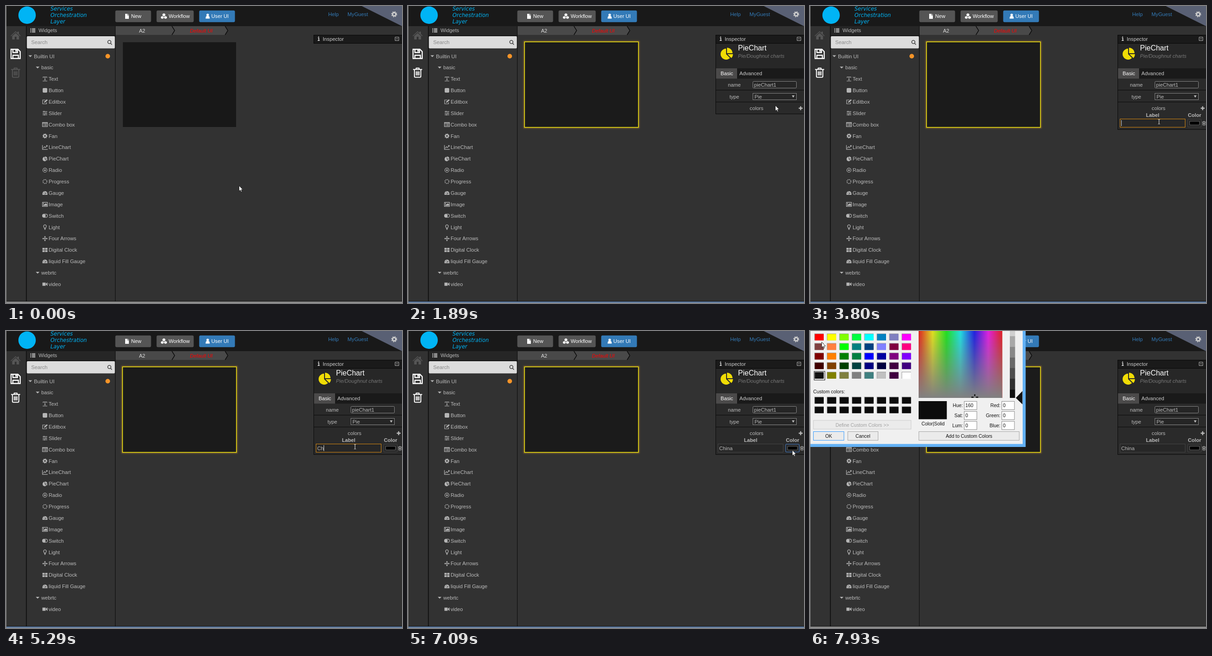
An HTML page that plays this animation: 864 px wide and 648 px high, repeating every 8 s.

```html
<!DOCTYPE html>
<html lang="en">
<head>
<meta charset="utf-8">
<title>Widget editor</title>
<style>
html, body { margin: 0; width: 100%; height: 100%; overflow: hidden; background: #323232; }
svg { display: block; }
text { font: 11.2px "Liberation Sans", Arial, sans-serif; fill: #bbb; white-space: pre; }
.mid { text-anchor: middle; }
.end { text-anchor: end; }
.white { fill: #fff; }
.brand text { font: italic 11.6px "DejaVu Sans", sans-serif; fill: #00b4f5; }
.link { fill: #337ab7; }
.bold { font-weight: bold; }
.ico { fill: none; stroke: #b5b5b5; stroke-width: 1.2; }
.ico .f, .f { fill: #b5b5b5; stroke: none; }
#dialog text { font-size: 10.4px; fill: #111; }
</style>
</head>
<body>
<svg width="864" height="648" viewBox="0 0 864 648">
<defs>
  <linearGradient id="hue">
    <stop stop-color="#f00"/><stop offset=".167" stop-color="#ff0"/><stop offset=".333" stop-color="#0f0"/>
    <stop offset=".5" stop-color="#0ff"/><stop offset=".667" stop-color="#00f"/><stop offset=".833" stop-color="#f0f"/>
    <stop offset="1" stop-color="#f00"/>
  </linearGradient>
  <linearGradient id="fade" x2="0" y2="1">
    <stop stop-color="#808080" stop-opacity=".1"/><stop offset="1" stop-color="#808080"/>
  </linearGradient>
  <filter id="glow" x="-5%" y="-5%" width="110%" height="110%"><feGaussianBlur stdDeviation="1.5"/></filter>
  <path id="pie" d="M0 0L8.5 8.5A12 12 0 1 1 0-12ZM3 0H15A12 12 0 0 1 11.5 8.5ZM2-2V-14A12 12 0 0 1 14-2Z"/>
  <g id="gear" fill="none"><circle r="3.6" stroke-width="2.8"/><circle r="5.6" stroke-width="1.8" stroke-dasharray="2.2"/></g>
  <g id="trash" fill="none" stroke-width="2">
    <path d="M-10-7H10M-4-7L-3-10H3L4-7M-7-7V8Q-7 10-5 10H5Q7 10 7 8V-7M-3-3V6M0-3V6M3-3V6"/>
  </g>
</defs>

<!-- page -->
<rect width="864" height="648" fill="#323232"/>
<rect width="864" height="44" fill="#191919"/>
<path d="M776 0H864V44Z" fill="#596074"/>
<use href="#gear" x="847" y="18" stroke="#ccc"/>
<g class="brand">
  <circle cx="46" cy="20" r="19" fill="#00b4f5"/>
  <text x="97" y="10">Services</text><text x="97" y="24">Orchestration</text><text x="97" y="38">Layer</text>
</g>
<g fill="#555">
  <rect x="238.500" y="9.700" width="78" height="25.600" rx="3"/>
  <rect x="328.500" y="9.700" width="81" height="25.600" rx="3"/>
  <rect x="421.500" y="9.700" width="78" height="25.600" rx="3" fill="#337ab7"/>
</g>
<g fill="#fff">
  <path d="M260 17H265V20.500H268V28H260ZM266 17L268 19.500H266Z"/>
  <path d="M344.500 16L347.500 17.500V21L344.500 22.500L341.500 21V17.500ZM341 22L344 23.500V26.500L341 28L338 26.500V23.500ZM348 22L351 23.500V26.500L348 28L345 26.500V23.500Z"/>
  <circle cx="440" cy="19.500" r="2.700"/><path d="M435.500 27.500Q435.500 22 438 22H442Q444.500 22 444.500 27.500Z"/>
</g>
<text class="white" x="273" y="26">New</text>
<text class="white" x="355" y="26">Workflow</text>
<text class="white" x="448" y="26">User UI</text>
<text class="link" x="703" y="22">Help</text>
<text class="link" x="745" y="22">MyGuest</text>

<!-- tool strip -->
<g transform="translate(21 64)" fill="#555"><path d="M-11 1L0-9L4-5.500V-8H7V-3L11 1L10 2L0-7L-10 2ZM-7.500 1.500L0-5L7.500 1.500V9H2V3H-2V9H-7.500Z"/></g>
<g transform="translate(21 104.500)" fill="none" stroke="#fff" stroke-width="2.300">
  <path d="M-10-10H5L10-5V10H-10ZM-6-10V-3H4V-10M-6 10V3H6V10"/><path d="M1-9V-5" stroke-width="3"/>
</g>
<use id="remove" href="#trash" x="21" y="145.500"/>

<!-- widget list -->
<path d="M44.500 44V645" stroke="#0a0a0a" stroke-width="1.600"/>
<path d="M238.500 44V645M44 64.500H238" stroke="#0a0a0a"/>
<rect x="45" y="44" width="193" height="20" fill="#262626"/>
<path d="M53 49.500H55M53 52H55M53 54.500H55M53 57H55M56.500 49.500H64M56.500 52H64M56.500 54.500H64M56.500 57H64" stroke="#ccc" stroke-width="1.300"/>
<text x="71" y="57">Widgets</text>
<rect x="45.500" y="66" width="192" height="26.500" rx="2" fill="#dcdcdc"/>
<text x="55" y="83" style="fill:#888">Search</text>
<g fill="none" stroke="#444" stroke-width="1.600"><circle cx="225.500" cy="78.500" r="3.500"/><path d="M228 81L231 84.500"/></g>
<circle cx="222" cy="109.500" r="5" fill="#f79428"/>
<g id="tree"></g>

<!-- breadcrumb and canvas -->
<path d="M239 44H478L484 53.500L478 63H239Z" fill="#494949"/>
<path d="M362 44L368 53.500L362 63M478 44L484 53.500L478 63" fill="none" stroke="#0c0c0c" stroke-width="1.500"/>
<text class="mid" x="297" y="57.500" style="fill:#ddd">A2</text>
<text class="mid" x="426" y="57.500" style="fill:#f00;font-style:italic">Default UI</text>
<rect x="255" y="79" width="247" height="185" fill="#181818"/>
<g id="selection" fill="none">
  <rect x="253.500" y="77.500" width="250" height="188" stroke="#e8a030" stroke-width="3" opacity=".45" filter="url(#glow)"/>
  <rect x="254.300" y="78.300" width="248.400" height="186.400" fill="#1b1b1b" stroke="#f2e80c" stroke-width="1.500"/>
</g>

<!-- inspector -->
<rect x="671.500" y="63.500" width="193" height="18" fill="#1a1a1a" stroke="#050505"/>
<path d="M680.500 69.500H682.500V75M680 75.300H684.500M681.300 67H683" fill="none" stroke="#ddd" stroke-width="1.600"/>
<text x="691" y="75.500" style="fill:#ccc">Inspector</text>
<path d="M849 68H857V75.500H849ZM851 71.700H855" fill="none" stroke="#bbb"/>
<g id="props">
  <rect id="panel" x="671.500" y="81.500" width="193" fill="#2a2a2a" stroke="#080808"/>
  <rect x="672" y="82" width="192" height="54" fill="#272727"/>
  <use href="#pie" x="694" y="105" fill="#f0dc05"/>
  <text class="white" x="720" y="97" style="font-size:16px">PieChart</text>
  <text x="720" y="113" style="fill:#777;font-style:italic">Pie/Doughnut charts</text>
  <rect x="672" y="136" width="192" height="22.500" fill="#1a1a1a"/>
  <rect x="672" y="136" width="46" height="22.500" fill="#4b4a4a"/>
  <text class="white" x="682" y="151">Basic</text><text x="723" y="151" style="fill:#ccc">Advanced</text>
  <path d="M672 183.500H864M672 209.500H864" stroke="#0a0a0a"/>
  <text class="mid" x="712" y="176">name</text><text class="mid" x="712" y="201.500">type</text>
  <g fill="#252525" stroke="#888"><rect x="752.500" y="164.500" width="95" height="14.500" rx="2"/><rect x="752.500" y="190.500" width="95" height="14"/></g>
  <text x="755" y="176">pieChart1</text><text x="756" y="201.500">Pie</text>
  <path d="M837.500 195H843.500L840.500 200Z" fill="#bbb"/>
  <text class="mid" x="760.500" y="227">colors</text>
  <path d="M852.500 223H861M856.700 218.700V227.300" stroke="#bbb" stroke-width="2.400"/>
</g>
<g id="entry">
  <text class="mid bold" x="747.500" y="242">Label</text><text class="mid bold" x="839" y="242">Color</text>
  <rect id="field" x="676.500" y="246.500" width="142" height="18" fill="#272727"/>
  <text id="label" x="679" y="259.500"></text>
  <path id="caret" d="M.5 249V262" stroke="#ddd"/>
  <rect id="chip" x="824" y="247" width="29.500" height="17" rx="1" fill="#272727"/>
  <rect x="828.500" y="251.500" width="21" height="8" fill="#000" stroke="#666"/>
  <use href="#trash" transform="translate(859.500 256) scale(.42)" stroke="#bbb"/>
</g>

<!-- window edge -->
<path d="M.5 0V648" stroke="#888"/>
<path d="M1 644.500H864" stroke="#111"/>
<rect id="edge" x="1" y="645" width="863" height="2"/>
<rect y="647" width="864" height="1" fill="#777"/>

<!-- colour dialog -->
<g id="dialog">
  <rect x="1" width="469.500" height="253" fill="#63b1f5"/>
  <rect x="1" width="463" height="246.500" fill="#f0f0f0"/>
  <g id="cells"></g>
  <rect x="237" y="-30" width="182.500" height="176" fill="url(#hue)"/>
  <rect x="237" y="-30" width="182.500" height="176" fill="url(#fade)"/>
  <path d="M359.500 138V142M352 144.500H357M362 144.500H367" stroke="#111" stroke-width="2.500"/>
  <g id="lum"></g>
  <path d="M449 146L463.500 131V160Z" fill="#111"/>
  <rect x="237" y="153" width="61.500" height="39.500" fill="#0c0c0c"/>
  <text class="mid" x="268.500" y="205.500">Color|Solid</text>
  <text x="7" y="135.500">Custom colors:</text>
  <g id="numbers"></g>
  <g id="buttons"></g>
</g>

<path id="arrow" d="M0 0V12L2.800 9.400L4.600 13.600L6.500 12.800L4.700 8.800H8.400Z" fill="#fff" stroke="#111" stroke-width=".8"/>
<path id="beam" d="M-2-5.500H-.7L0-5L.7-5.500H2M0-5V4L-.7 4.500H-2M0 4L.7 4.500H2" fill="none" stroke="#eee"/>
</svg>

<script>
const $ = id => document.getElementById(id);
const P = (d, filled) => `<path d="${d}"${filled ? ' class="f"' : ''}/>`;
const rect = (x, y, w, h, attrs) => `<rect x="${x}" y="${y}" width="${w}" height="${h}" ${attrs}/>`;
const text = (x, y, s, attrs = '') => `<text x="${x}" y="${y}" ${attrs}>${s}</text>`;

const gauge = P('M-5.500 4Q-6-4 0-4Q6-4 5.500 4Z', 1) +
  '<path d="M0 3L1.500-1M-3.500 1H-2.500M-2-2H-1M3 1H4" stroke="#323232"/>';
const tree = [
  [0, 'Builtin UI'], [1, 'basic'],
  [2, 'Text', P('M-4-2.500V-4.500H4V-2.500M0-4.500V2M-2 2H2M-5 4.500H5')],
  [2, 'Button', '<rect x="-5" y="-5" width="10" height="10" rx="2" class="f"/>'],
  [2, 'Editbox', P('M3.500 1V4.500H-5V-4H1') + P('M-2 2L-1.500-.5L4-5.500L6-3.500L.5 1.500Z', 1)],
  [2, 'Slider', P('M-5-3.500H5M-5 0H5M-5 3.500H5M-2-5V-2M2-1.500V1.500M-1 2V5')],
  [2, 'Combo box', P('M-5.500-4.500H5.500V4.500H-5.500ZM-5-3H5M-4-.5H-2.500M-1.500-.5H4M-4 2H-2.500M-1.500 2H4')],
  [2, 'Fan', '<use href="#gear" transform="scale(.82)"/>'],
  [2, 'LineChart', P('M-5.500-5V4.500H6M-4 2L-1-1.500L1 .5L5-4M2.500-4H5V-1.500')],
  [2, 'PieChart', '<use href="#pie" class="f" transform="translate(-.5 .5) scale(.4)"/>'],
  [2, 'Radio', '<circle r="4.500"/><circle r="1.800" class="f"/>'],
  [2, 'Progress', '<circle r="4.300" stroke-width="2" stroke-dasharray="1.700"/>'],
  [2, 'Gauge', gauge],
  [2, 'Image', P('M-5.500-4.500H5.500V4.500H-5.500Z') + P('M-4 3V1.500L-2-.5L-1 .5L2-2.500L4.500 0V3ZM-4-3H-2V-1H-4Z', 1)],
  [2, 'Switch', '<rect x="-5.500" y="-3.500" width="11" height="7" rx="3.500"/><circle cx="-2" r="3.500" class="f"/>'],
  [2, 'Light', P('M-1.500 2Q-1.500 1-2.500-.5A3 3 0 1 1 2.500-.5Q1.500 1 1.500 2ZM-1.500 3.500H1.500M-1 5H1')],
  [2, 'Four Arrows', P('M-4 0H4M0-4V4') + P('M-6 0L-3-2V2ZM6 0L3-2V2ZM0-6L-2-3H2ZM0 6L-2 3H2Z', 1)],
  [2, 'Digital Clock', P('M-5.500-4.500H-.5V-.5H-5.500ZM.5-4.500H5.500V-.5H.5ZM-5.500.5H-.5V4.500H-5.500ZM.5.5H5.500V4.500H.5Z', 1)],
  [2, 'liquid Fill Gauge', gauge],
  [1, 'webrtc'],
  [2, 'video', P('M-5.500-3.500H1.500V3.500H-5.500ZM2-.8L5.500-4V4L2 .8Z', 1)]
];
$('tree').innerHTML = tree.map(([depth, name, icon], i) => {
  const x = 61 + 16 * depth, y = 109.5 + 24.87 * i;
  const mark = icon || P('M-4-2H4L0 2Z', 1);
  return `<g class="ico" transform="translate(${x - 8} ${y})">${mark}</g>` +
    text(x, y + 4, name, 'stroke="none"');
}).join('');

const palette = `f00 ff0 80ff00 00ff40 0ff 0080c0 8080c0 f0f
  804040 ff8040 0f0 008080 004080 8080ff 800040 ff0080
  800000 ff8000 008000 008040 00f 0000a0 800080 8000ff
  400000 804000 004000 004040 000080 000040 400040 400080
  111 808000 808040 808080 408080 c0c0c0 400040 fff`.split(/\s+/);
const cell = (i, top, color) => {
  const x = 10.5 + 27.2 * (i % 8), y = top + 20.9 * (i >> 3);
  return rect(x - 1, y - 1, 21.5, 16, 'fill="#fff"') + rect(x - 1, y - 1, 20.5, 15, 'fill="#999"') +
    rect(x, y, 19.5, 14, `fill="${color}"`);
};
$('cells').innerHTML = palette.map((c, i) => cell(i, 6.5, '#' + c)).join('') +
  Array.from({ length: 16 }, (_, i) => cell(i, 144.5, '#0c0c0c')).join('') +
  rect(9, 88, 23.5, 19, 'fill="none" stroke="#111"');
$('lum').innerHTML = [208, 168, 136, 104, 78, 48, 17].map((v, i) =>
  rect(436, i * 23.2 - 12, 11.5, i < 6 ? 23.4 : 18.8, `fill="rgb(${v},${v},${v})"`)).join('');
$('numbers').innerHTML = [['Hue:', 160], ['Sat:', 0], ['Lum:', 0], ['Red:', 0], ['Green:', 0], ['Blue:', 0]]
  .map(([name, value], i) => {
    const x = i < 3 ? 336.5 : 418.5, y = 153.5 + 21.8 * (i % 3);
    return text(x - 3, y + 12.5, name, 'class="end"') +
      rect(x, y, 27.5, 18, 'fill="#fff" stroke="#888"') + text(x + 2.5, y + 12.5, value);
  }).join('');
$('buttons').innerHTML = [
  [7.5, 195, 213, 'Define Custom Colors &gt;&gt;', '#ccc', '#a0a0a0'],
  [7.5, 219.5, 66.5, 'OK', '#3399ff'],
  [82.5, 219.5, 66, 'Cancel', '#a5a5a5'],
  [237.5, 219.5, 219, 'Add to Custom Colors', '#a5a5a5']
].map(([x, y, w, s, line, ink = '#111']) =>
  rect(x, y, w, 19, `fill="#ebebeb" stroke="${line}"`) +
  text(x + w / 2, y + 13.5, s, `class="mid" style="fill:${ink}"`)).join('');

// [start ms, x, y]; each position holds until the next
const pointer = [
  [0, 508, 392], [680, 492, 362], [800, 450, 285], [920, 415, 218], [1040, 403, 197],
  [1463, 425, 203], [1606, 580, 235], [1749, 737, 249], [1890, 801, 217], [2040, 819, 220],
  [2180, 845, 225], [2320, 851, 228], [2440, 853, 227], [2575, 854, 225], [2710, 855, 224],
  [3260, 843, 232], [3395, 815, 242], [3530, 785, 250], [3665, 765, 252], [3800, 761, 253],
  [6457, 768, 254], [6614, 800, 256], [6770, 830, 259], [6927, 838, 260], [7240, 833, 257],
  [7360, 820, 250], [7503, 387, 153], [7645, 180, 80], [7788, 50, 30], [7930, 25, 24]
];
const typing = [[0, ''], [4880, 'C'], [5290, 'Ch'], [5440, 'Chi'], [5740, 'China']];
const at = (list, t) => list.filter(k => k[0] <= t).pop();
const show = (id, on) => $(id).setAttribute('display', on ? 'inline' : 'none');
const paint = (id, name, value) => $(id).setAttribute(name, value);

function draw() {
  const t = performance.now() % 8000;
  const between = (a, b) => t >= a && t < b;
  const selected = t >= 1320, dialog = t >= 7240, stale = between(7240, 7503);

  show('selection', selected);
  show('props', selected);
  show('entry', t >= 2980);
  show('dialog', dialog);
  paint('remove', 'stroke', selected ? '#fff' : '#555');
  paint('edge', 'fill', selected && !dialog ? '#6288bb' : '#999');
  paint('panel', 'height', t < 2980 ? 154 : 188);

  paint('field', 'stroke', stale ? 'none' : between(3665, 6927) ? '#d98a12' : '#444');
  paint('chip', 'stroke', stale ? 'none' : between(6927, 7240) ? '#4a83d0' : '#444');
  $('label').textContent = at(typing, t)[1];
  show('caret', between(3665, 4200) || between(4730, 6300));
  paint('caret', 'transform', `translate(${Math.floor(679 + $('label').getComputedTextLength())} 0)`);

  const [, x, y] = at(pointer, t), beam = between(3530, 6770);
  show('arrow', !beam);
  show('beam', beam);
  paint(beam ? 'beam' : 'arrow', 'transform', `translate(${x + .5} ${y})`);
  requestAnimationFrame(draw);
}
draw();
</script>
</body>
</html>
```
